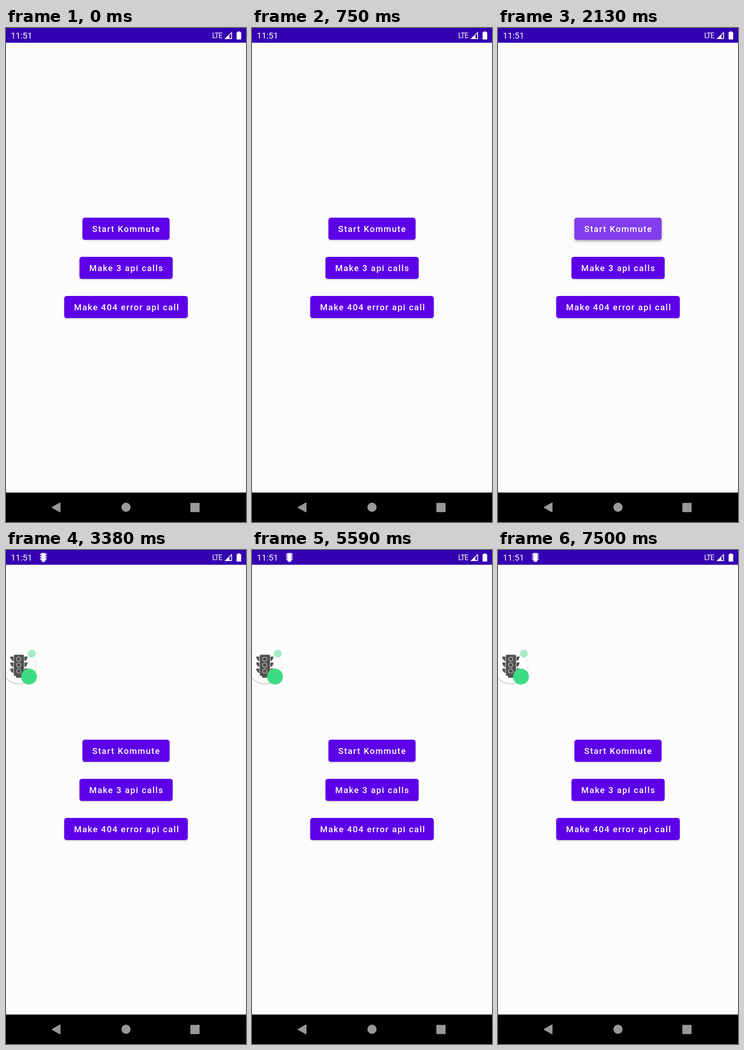
These frames come from a looping animation (522x1073 px, 8 s). An HTML page:

```html
<!DOCTYPE html>
<html lang="en">
<head>
<meta charset="utf-8">
<title>Kommute demo</title>
<style>
  html, body { margin: 0; width: 100%; height: 100%; overflow: hidden; background: #fcfcfc; }
  svg { display: block; width: 522px; height: 1073px; }
  text { font-family: Roboto, sans-serif; fill: #fff; }
  .label { font-size: 18.67px; font-weight: 500; letter-spacing: 1.667px; }
  .clock { font-size: 18.67px; }
  .network { font-size: 15.8px; letter-spacing: -1.2px; }
  .rest { fill: rgba(0, 0, 0, .2); filter: blur(1.6px); }
  .raised { fill: rgba(0, 0, 0, .2); filter: blur(3px); opacity: 0; }
  .ripple { fill: #fff; opacity: 0; }
  .pop { transform-box: fill-box; transform-origin: center; }
</style>
</head>
<body>
<svg viewBox="0 0 522 1073">
  <defs>
    <g id="light">
      <rect x="8" width="22" height="46" rx="3"/>
      <rect x="13" y="45" width="12" height="5"/>
      <path id="flaps" d="M0 4H7V14Q1 12 0 4ZM38 4H31V14Q37 12 38 4Z"/>
      <use href="#flaps" y="13"/>
      <use href="#flaps" y="26"/>
    </g>
  </defs>

  <rect width="522" height="1073" fill="#fcfcfc"/>
  <rect width="522" height="32" fill="#3500b1"/>
  <text class="clock" x="10.5" y="23">11:51</text>
  <text class="network" x="448.5" y="21.7">LTE</text>
  <path d="M491.5 8V24H475Z" fill="#fff"/>
  <path d="M486 15.5L489.7 12V22.2H486Z" fill="#3500b1"/>
  <path d="M504 7.5H509V9H510.5Q511.5 9 511.5 10V24Q511.5 25 510.5 25H502.5Q501.5 25 501.5 24V10Q501.5 9 502.5 9H504Z" fill="#fff"/>
  <g id="notice"><use href="#light" fill="#fff" transform="translate(73.7 6.5) scale(.405 .39)"/></g>

  <g id="buttons"></g>

  <g id="bubble" class="pop">
    <circle cx="28" cy="254" r="37" fill="#000" opacity=".35" style="filter:blur(.9px)"/>
    <circle cx="28" cy="253" r="37" fill="#fdfdfd"/>
    <use href="#light" x="9" y="227.5" fill="#505050"/>
    <g fill="none" stroke="#d4d4d0" stroke-width="1.2">
      <circle cx="27.7" cy="237" r="4.8"/>
      <circle cx="27.7" cy="250" r="4.8"/>
      <circle cx="27.7" cy="263" r="4.8"/>
    </g>
    <circle cx="50" cy="275" r="17.3" fill="#3ddc84"/>
    <circle id="dot" class="pop" cx="56" cy="225" r="8.7" fill="#a6ebc5"/>
  </g>

  <rect y="1009" width="522" height="64" fill="#000"/>
  <g fill="#999" stroke="#999" stroke-width="2" stroke-linejoin="round">
    <path d="M100.5 1041.3L117.5 1031.5V1051Z"/>
    <circle cx="261" cy="1041" r="9"/>
    <rect x="402" y="1032.5" width="18" height="18"/>
  </g>
</svg>
<script>
const LOOP = 8000;
const BUTTONS = [
  { label: 'Start Kommute', x: 166.2, y: 412, w: 189.6, press: 1880, release: 2250 },
  { label: 'Make 3 api calls', x: 159.8, y: 497, w: 202.7, press: 4380, release: 4750 },
  { label: 'Make 404 error api call', x: 126.6, y: 582, w: 268.8, press: 6010, release: 6430 },
];

// Each step is [time in ms, value, easing]; the end values hold to the loop's edges.
function play(el, property, steps) {
  const frames = [[0, steps[0][1]], ...steps, [LOOP, steps[steps.length - 1][1]]]
    .map(([time, value, easing = 'linear']) => ({ offset: time / LOOP, [property]: value, easing }));
  const animation = el.animate(frames, { duration: LOOP, iterations: Infinity });
  animation.startTime = 0 + start;
}

const start = document.timeline.currentTime ?? 0;
const byId = id => document.getElementById(id);

BUTTONS.forEach(({ label, x, y, w, press, release }, i) => {
  const box = `x="${x}" width="${w}" height="48" rx="5.3"`;
  const group = byId('buttons').appendChild(
    document.createElementNS('http://www.w3.org/2000/svg', 'g'));
  group.innerHTML = `
    <clipPath id="clip${i}"><rect ${box} y="${y}"/></clipPath>
    <rect class="rest" ${box} y="${y + 1.8}"/>
    <rect class="raised" ${box} y="${y + 4}"/>
    <rect ${box} y="${y}" fill="#5d00e9"/>
    <g clip-path="url(#clip${i})">
      <circle class="ripple pop" cx="261" cy="${y + 24}" r="${Math.hypot(w, 48) / 2}"/>
    </g>
    <text class="label" x="${x + 21.3}" y="${y + 31}">${label}</text>`;

  const ripple = group.querySelector('.ripple');
  play(ripple, 'opacity', [
    [press, 0], [press + 75, .24], [release, .24], [release + 180, 0],
  ]);
  play(ripple, 'transform', [
    [press, 'scale(.45)', 'cubic-bezier(.4, 0, .2, 1)'], [press + 200, 'scale(1)'],
  ]);
  play(group.querySelector('.raised'), 'opacity', [
    [press, 0], [press + 120, 1], [release, 1], [release + 150, 0],
  ]);
});

play(byId('notice'), 'opacity', [[2710, 0], [2710, 1]]);
play(byId('bubble'), 'transform', [
  [2790, 'scale(0)', 'cubic-bezier(.2, .7, .3, 1)'], [2960, 'scale(1.06)', 'ease-in-out'], [3080, 'scale(1)'],
]);
play(byId('dot'), 'transform', [
  [3000, 'scale(0)', 'ease-out'], [3160, 'scale(1)'],
]);
</script>
</body>
</html>
```
